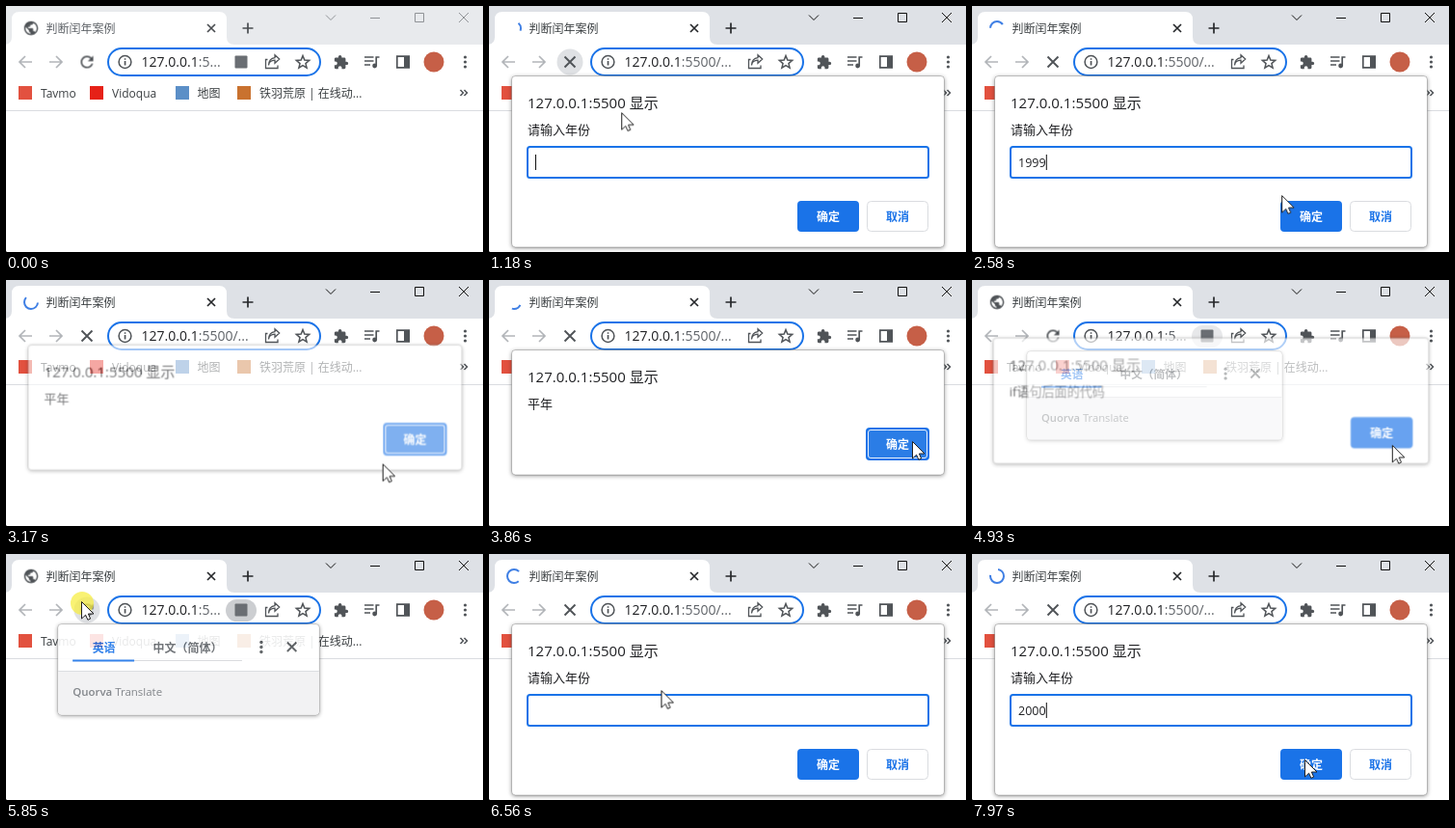
These frames come from a looping animation (495 by 255 pixels, 8000 ms). An HTML page:

```html
<!DOCTYPE html>
<html lang="zh-CN">
<head>
<meta charset="utf-8">
<title>判断闰年案例</title>
<style>
html, body { margin: 0; width: 100%; height: 100%; overflow: hidden; background: #fff; }
svg { display: block; width: 100vw; height: 100vh; }
text { font: 12px "Open Sans", "Noto Sans CJK SC", "Noto Sans CJK", sans-serif; fill: #3c4043; white-space: pre; }
.line { fill: none; stroke: currentColor; }
.grey { color: #505458; fill: #505458; }
.pale { color: #b2b5b9; }
.url { font-size: 14px; fill: #202124; }
.url tspan { fill: #5f6368; }
.head { font-size: 15px; fill: #202124; }
.body { font-size: 13px; fill: #202124; }
.value { font-size: 12.5px; fill: #202124; }
.label { font-weight: 600; text-anchor: middle; }
.popup { transform-box: fill-box; transform-origin: center; }
.sheet { fill: #fff; stroke: rgba(0,0,0,.22); filter: drop-shadow(0 1px 2px rgba(0,0,0,.4)); }
</style>
</head>
<body>
<svg viewBox="0 0 495 255" preserveAspectRatio="none">
  <rect width="495" height="255" fill="#fff"/>
  <rect id="strip" width="495" height="40" fill="#dee1e6"/>
  <path d="M-2 40Q6 40 6 32V14Q6 6 14 6H221Q229 6 229 14V32Q229 40 237 40Z" fill="#fff"/>
  <g id="globe" class="grey"><path transform="translate(17.3 14.3) scale(.725)" d="M12 2C6.48 2 2 6.48 2 12s4.48 10 10 10 10-4.48 10-10S17.52 2 12 2zm-1 17.93c-3.95-.49-7-3.85-7-7.93 0-.62.08-1.21.21-1.79L9 15v1c0 1.1.9 2 2 2v1.93zm6.9-2.54c-.26-.81-1-1.39-1.9-1.39h-1v-3c0-.55-.45-1-1-1H8v-2h2c.55 0 1-.45 1-1V7h2c1.1 0 2-.9 2-2v-.41c2.93 1.19 5 4.06 5 7.41 0 2.08-.8 3.97-2.1 5.39z"/></g>
  <circle id="spinner" cx="26" cy="23" r="7" pathLength="360" fill="none" stroke="#3f7fe4" stroke-width="2"/>
  <text id="title" x="41.5" y="27.5">判断闰年案例</text>
  <path id="tabs" class="line" stroke-width="1.7" d="M209 19l8 8m0-8l-8 8M251 17.5v11M245.5 23h11"/>
  <path id="controls" class="line" d="M332 9.5l5 5 5-5M378 12.5h10M424.5 7.5h9v9h-9zM470 7l10 10m0-10l-10 10"/>

  <circle id="hover" cx="84" cy="58" r="13.5" fill="#dfe1e4"/>
  <path class="line pale" stroke-width="1.7" d="M27 58H14m6-6l-6 6 6 6M45 58h13m-6-6l6 6-6 6"/>
  <g id="reload" class="grey"><path transform="translate(74.2 48.2) scale(.82)" d="M17.65 6.35C16.2 4.9 14.21 4 12 4c-4.42 0-7.99 3.58-7.99 8s3.57 8 7.99 8c3.73 0 6.84-2.55 7.73-6h-2.08c-.82 2.33-3.04 4-5.65 4-3.31 0-6-2.69-6-6s2.69-6 6-6c1.66 0 3.14.69 4.22 1.78L13 11h7V4l-2.35 2.35z"/></g>
  <path id="stop" class="line" color="#505458" stroke-width="1.9" d="M78.5 52.5l11 11m0-11l-11 11"/>

  <rect x="106" y="44" width="220" height="28" rx="14" fill="#fff" stroke="#1a73e8" stroke-width="2"/>
  <g class="grey">
    <circle class="line" cx="123.5" cy="58" r="6.4" stroke-width="1.5"/>
    <path d="M122.7 57h1.7v4.5h-1.7zM122.7 54.2h1.7v1.6h-1.7z"/>
  </g>
  <g id="idle">
    <text class="url" x="140.5" y="63">127.0.0.1<tspan>:5...</tspan></text>
    <rect id="pill" x="228" y="47" width="32" height="23" rx="11.5" fill="#c4c6ca"/>
    <rect x="237.5" y="51.5" width="13" height="13" rx="1" fill="#6a6e73"/>
  </g>
  <text id="busy" class="url" x="140.5" y="63">127.0.0.1<tspan>:5500/...</tspan></text>
  <g class="grey">
    <path class="line" stroke-width="1.3" d="M271.5 55.5h-2v9h12.5v-3M272.5 61.5q.5-5 6.5-5.3v3l4.7-4.2-4.7-4.2v2.8q-6.2.6-6.5 7.9z"/>
    <path id="star" class="line" stroke-width="1.5"/>
    <path transform="translate(339.5 50.2) scale(.68)" d="M20.5 11H19V7c0-1.1-.9-2-2-2h-4V3.5C13 2.12 11.88 1 10.5 1S8 2.12 8 3.5V5H4c-1.1 0-1.99.9-1.99 2v3.8H3.5c1.49 0 2.7 1.21 2.7 2.7s-1.21 2.7-2.7 2.7H2V20c0 1.1.9 2 2 2h3.8v-1.5c0-1.49 1.21-2.7 2.7-2.7s2.7 1.21 2.7 2.7V22H17c1.1 0 2-.9 2-2v-4h1.5c1.38 0 2.5-1.12 2.5-2.5S21.88 11 20.5 11z"/>
    <path class="line" stroke-width="1.7" d="M372 53h9.5M372 57h9.5M372 61h6M384.2 62.5v-9.5h3.3"/>
    <circle cx="382.6" cy="62" r="2.4"/>
    <path class="line" stroke-width="1.7" d="M405.8 52.2h12.4v11.6h-12.4z"/>
    <path d="M413 52h5.5v12H413z"/>
    <circle cx="476.5" cy="53" r="1.6"/><circle cx="476.5" cy="58" r="1.6"/><circle cx="476.5" cy="63" r="1.6"/>
  </g>
  <circle cx="444" cy="58" r="10.5" fill="#c65f47"/>

  <rect x="13" y="83" width="14" height="14" fill="#e2513f"/>
  <text x="36" y="94.5">Tavmo</text>
  <rect x="87" y="83" width="14" height="14" fill="#e62117"/>
  <text x="110" y="94.5">Vidoqua</text>
  <rect x="176" y="83" width="14" height="14" fill="#5b8fc7"/>
  <text x="198.5" y="94.5">地图</text>
  <rect x="240" y="83" width="14" height="14" fill="#c9722f"/>
  <text x="263" y="94.5">铁羽荒原 | 在线动...</text>
  <path class="line" color="#505458" stroke-width="1.5" d="M471.5 87l3 3-3 3M475.5 87l3 3-3 3"/>
  <path d="M0 108.5h495" stroke="#dadce0"/>
  <path d="M0 254h1v1H0z" fill="#999"/>

  <g id="dialogs"></g>

  <g id="bubble" class="popup">
    <rect class="sheet" x="53.5" y="72.5" width="272" height="94.5" rx="4"/>
    <path d="M54 121h271v42q0 3.5-3.5 3.5H57.5q-3.5 0-3.5-3.5z" fill="#f1f1f2"/>
    <path d="M54 121.5h271" stroke="#d8dadd"/>
    <path d="M69 110.5h176" stroke="#d5d7da"/>
    <path d="M69 110.5h64" stroke="#1a73e8" stroke-width="2"/>
    <text class="label" x="101.5" y="101.5" style="fill:#1a73e8">英语</text>
    <text class="label" x="188.5" y="101.5" style="fill:#5f6368">中文（简体）</text>
    <g class="grey">
      <circle cx="265" cy="91.5" r="1.7"/><circle cx="265" cy="96.5" r="1.7"/><circle cx="265" cy="101.5" r="1.7"/>
      <path class="line" stroke-width="1.9" d="M292 91.5l9.5 9.5m0-9.5l-9.5 9.5"/>
    </g>
    <text x="69" y="147.5" style="font-size:11.5px;fill:#72767b"><tspan font-weight="600">Quorva</tspan> Translate</text>
  </g>

  <g id="pointer">
    <circle id="flash" cx="1" cy="2" r="12" fill="#f7ee45"/>
    <path d="M.5 .5V18L4.6 14.2L6.9 19.3L9.6 18.1L7.4 13H13Z" fill="#fff" stroke="#222" stroke-linejoin="round"/>
  </g>
</svg>
<script>
const LOOP = 8000;
const start = document.timeline.currentTime || 0;
const $ = id => document.getElementById(id);

// rows: [time, value, easing]
function run(el, prop, rows) {
  const all = [[0, rows[0][1], 'step-end'], ...rows, [LOOP, rows[rows.length - 1][1]]];
  const frames = all.map(([t, v, easing = 'linear']) => ({ offset: t / LOOP, [prop]: v, easing }));
  el.animate(frames, { duration: LOOP, iterations: Infinity }).startTime = start;
}

const steps = (el, prop, rows) => run(el, prop, rows.map(([t, v]) => [t, v, 'step-end']));

const show = (el, spans) =>
  steps(el, 'opacity', [[0, 0], ...spans.flatMap(([a, b]) => [[a, 1], [b, 0]])]);

// Fade and shift a popup in and out over the given spans
function popup(el, spans, away, leave) {
  const rows = (off, on) => spans.flatMap(([a, b]) => [
    [a, off, 'ease-out'], [a + 150, on], [b, on, leave], ...(b < LOOP ? [[b + 180, off]] : [])
  ]);
  run(el, 'opacity', rows(0, 1).map(([t, v]) => [t, v]));
  run(el, 'transform', rows(away, 'none'));
}

function group(parent, html) {
  const g = document.createElementNS('http://www.w3.org/2000/svg', 'g');
  g.innerHTML = html;
  parent.append(g);
  return g;
}

// Window and page state
const ACTIVE = 860;
const loads = [[1000, 4880], [5950, LOOP]];
const rests = [[0, 1000], [4880, 5950]];

steps($('strip'), 'fill', [[0, '#e8eaed'], [ACTIVE, '#dee1e6']]);
steps($('title'), 'fill', [[0, '#5f6368'], [ACTIVE, '#3c4043']]);
steps($('tabs'), 'color', [[0, '#4a4d51'], [ACTIVE, '#26282b']]);
steps($('controls'), 'color', [[0, '#909397'], [ACTIVE, '#111']]);
for (const id of ['globe', 'reload', 'idle']) show($(id), rests);
for (const id of ['spinner', 'stop', 'busy']) show($(id), loads);
show($('hover'), [[740, 1260], [5530, 6150]]);

$('star').setAttribute('d', 'M' + Array.from({ length: 10 }, (_, i) => {
  const r = i % 2 ? 3.1 : 7, a = (i * 36 - 90) * Math.PI / 180;
  return (308 + r * Math.cos(a)).toFixed(2) + ' ' + (58.6 + r * Math.sin(a)).toFixed(2);
}).join('L') + 'Z');

// Spinner: steady turn plus an arc that grows and shrinks
const ARC = 666, SWEEP = 270, TURN = 1568;

function ease(x) { // cubic-bezier(.4, 0, .2, 1)
  let lo = 0, hi = 1, u = .5;
  for (let i = 0; i < 16; i++) {
    u = (lo + hi) / 2;
    const bx = 1.2 * u * (1 - u) ** 2 + .6 * u * u * (1 - u) + u ** 3;
    if (bx < x) lo = u; else hi = u;
  }
  return u * u * (3 - 2 * u);
}

function arc(t) {
  const e = t + ARC, grown = SWEEP * ease(e % ARC / ARC);
  let from = 270 + 360 * t / TURN + SWEEP * Math.floor(e / (2 * ARC));
  let size = grown;
  if (Math.floor(e / ARC) % 2 === 0) {
    size = SWEEP - grown;
    from -= size;
  }
  return [from, Math.max(size, 5)];
}

const dash = [], shift = [];
for (const [a, b] of loads) {
  for (let t = a; t < b; t += 25) {
    const [from, size] = arc(t - a);
    dash.push([t, `${size} ${360 - size}`]);
    shift.push([t, -(from % 360)]);
  }
}
steps($('spinner'), 'strokeDasharray', dash);
steps($('spinner'), 'strokeDashoffset', shift);

// Dialogs
const UP = 'translateY(-24px) scale(1.013)';

function dialog(height, message, extra, spans) {
  const g = group($('dialogs'), `
    <rect class="sheet" x="23.5" y="72.5" width="449" height="${height}" rx="4"/>
    <text class="head" x="40" y="106">127.0.0.1:5500 显示</text>
    <text class="body" x="40" y="133">${message}</text>${extra}`);
  g.setAttribute('class', 'popup');
  popup(g, spans, UP, 'ease-out');
  return g;
}

const label = (x, y, text, color) =>
  `<text class="label" x="${x}" y="${y}" style="fill:${color}">${text}</text>`;

const prompts = [
  { open: 1020, close: 2860, word: '1999', keys: [1650, 1850, 2000, 2150] },
  { open: 5980, close: LOOP, word: '2000', keys: [6850, 7050, 7300, 7500] }
];

const ask = dialog(177.5, '请输入年份', `
  <rect x="40" y="146" width="416" height="32" rx="2.5" fill="#fff" stroke="#1a73e8" stroke-width="2"/>
  <rect x="320" y="202" width="64" height="32" rx="4" fill="#1a73e8"/>
  <rect x="392.5" y="202.5" width="63" height="31" rx="4" fill="#fff" stroke="#dadce0"/>
  ${label(352, 222.5, '确定', '#fff')}${label(424, 222.5, '取消', '#1a73e8')}`,
  prompts.map(p => [p.open, p.close]));

const caret = group(ask, '<path d="M48.5 154v16" stroke="#111"/>');
const places = [], blinks = [];
for (const { open, close, word, keys } of prompts) {
  const gone = Math.min(close + 180, LOOP);
  [open, ...keys].forEach((t, n) => {
    const next = keys[n] ?? gone;
    places.push([t, `translateX(${n * 7.2}px)`]);
    for (let b = t; b < next; b += 1000) blinks.push([b, Math.min(b + 500, next)]);
    if (n) show(group(ask, `<text class="value" x="48" y="167">${word.slice(0, n)}</text>`), [[t, next]]);
  });
}
steps(caret, 'transform', places);
show(caret, blinks);

for (const [message, open, close] of [['平年', 3080, 3960], ['if语句后面的代码', 4180, 4870]]) {
  const g = dialog(129.5, message,
    '<rect x="392" y="154" width="64" height="32" rx="4" fill="#1a73e8"/>', [[open, close]]);
  show(group(g, `
    <rect x="391" y="153" width="66" height="34" rx="4" fill="#1a73e8"/>
    <rect x="393.5" y="155.5" width="61" height="29" rx="2.5" fill="#2b7de6" stroke="#e8f0fe"/>`), [[open, close]]);
  group(g, label(424, 174.8, '确定', '#fff'));
}

popup($('bubble'), [[4870, 5830]], 'scale(.94)', 'ease-in');
run($('pill'), 'opacity', [[4870, 0], [5020, 1], [5830, 1], [5980, 0]]);

// Pointer path: time, x, y
const path = [
  [240, -14, 258], [560, 30, 150], [800, 80, 52], [1000, 80, 52], [1180, 137, 110],
  [1350, 175, 150], [1600, 222, 188], [2250, 222, 188], [2480, 302, 186], [2580, 321, 196],
  [2680, 337, 203], [2800, 345, 212], [2950, 345, 212], [3400, 438, 168], [3860, 439, 167],
  [4300, 439, 167], [4600, 436, 171], [4930, 436, 171], [5160, 391, 150], [5550, 78, 49],
  [5920, 78, 49], [6300, 140, 120], [6530, 175, 140], [6800, 205, 150], [7250, 290, 177],
  [7400, 291, 178], [7970, 345, 213]
];
run($('pointer'), 'transform', path.map(([t, x, y]) => [t, `translate(${x}px, ${y}px)`]));

const clicks = [860, 2800, 3910, 4780, 5790];
run($('flash'), 'opacity', clicks.flatMap(t => [[t - 1, 0], [t, .75], [t + 80, .75], [t + 140, 0]]));
</script>
</body>
</html>
```
